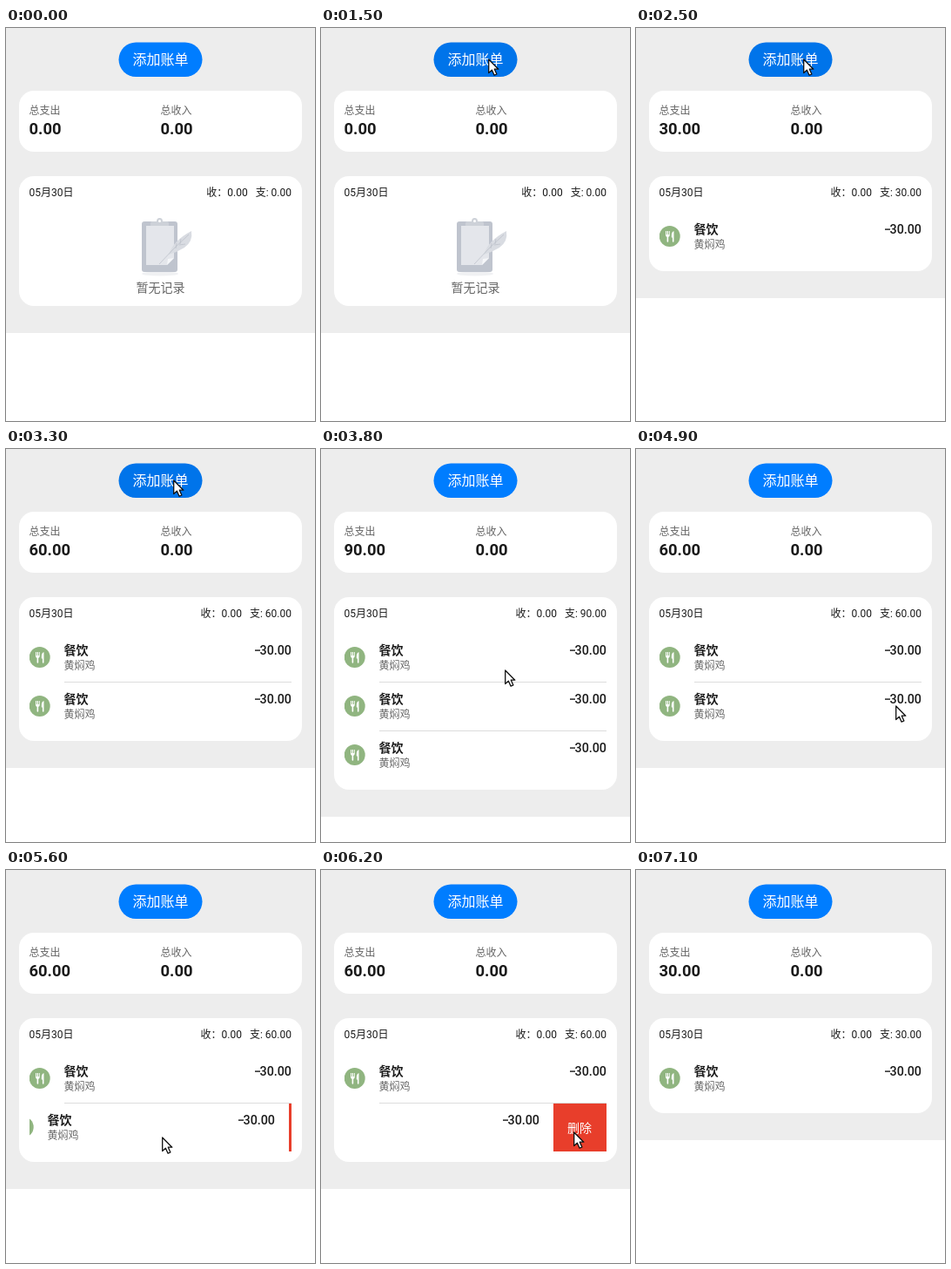
Recreate the animation shown at these times as an HTML page. Size 355x451 px, loop 7.6 s.

```html
<!DOCTYPE html>
<html lang="zh-CN">
<head>
<meta charset="utf-8">
<style>
  html, body { margin: 0; width: 100%; height: 100%; overflow: hidden; background: #fff; }
  svg { display: block; width: 355px; height: 451px; }
  text { font: 12px Roboto, "Noto Sans CJK SC", "Noto Sans CJK", sans-serif; fill: #1a1a1a; white-space: pre; }
  .muted { fill: #666; }
  .sum { font-size: 18.4px; font-weight: 700; }
  .name { font-size: 14px; font-weight: 600; }
  .cost { font-size: 14.3px; font-weight: 500; }
  .mid { text-anchor: middle; }
  .end { text-anchor: end; }
</style>
</head>
<body>
<svg viewBox="0 0 355 451">
  <defs>
    <clipPath id="list"><rect x="27" y="211" width="301" height="168"/></clipPath>
    <g id="row">
      <circle cx="38.7" cy="28" r="12" fill="#90b580"/>
      <path fill="#fff" d="M34 22v4.5q0 2 1.6 2.4V34q0 .8.8.8t.8-.8v-5.1q1.6-.4 1.6-2.4V22h-.9v4h-.9v-4h-1.2v4h-.9v-4zM43.500 22q-2.700 1-2.700 5v2.500h1.100V34q0 .8.8.8t.8-.8z"/>
      <text class="name" x="66.5" y="25">餐饮</text>
      <text class="muted" x="66.5" y="41.5">黄焖鸡</text>
      <text class="cost end" x="328" y="25">30.00</text>
      <rect x="286" y="19.400" width="6" height="1.400" fill="#1a1a1a"/>
    </g>
  </defs>

  <rect id="page" width="355" fill="#ededed"/>
  <rect id="button" x="129.5" y="16.5" width="96" height="39.500" rx="19.750"/>
  <text class="mid" x="177.5" y="42" style="font-size:16px;font-weight:500;fill:#fff">添加账单</text>

  <rect x="15" y="72" width="325" height="70" rx="17" fill="#fff"/>
  <text class="muted" x="26.5" y="98.5">总支出</text>
  <text class="muted" x="177.5" y="98.5">总收入</text>
  <text id="spent" class="sum" x="26.5" y="122"></text>
  <text class="sum" x="177.5" y="122">0.00</text>

  <rect id="card" x="15" y="170" width="325" rx="17" fill="#fff"/>
  <text x="26.5" y="192.5">05月30日</text>
  <text class="end" x="328" y="192.5">收：0.00<tspan id="day" dx="9"></tspan></text>

  <g id="empty">
    <ellipse cx="177" cy="282" rx="21" ry="2.5" fill="#f0f1f3"/>
    <rect x="156" y="222" width="41" height="58" rx="3" fill="#bfc4ce"/>
    <path d="M161 227h32v37l-8 8h-24z" fill="#e4e6eb"/>
    <path d="M193 264l-8 8 1-7z" fill="#f6f7f9"/>
    <path d="M166 227v-3q0-2 2-2h5q0-4 3.5-4t3.5 4h5q2 0 2 2v3z" fill="#cdd1d8"/>
    <circle cx="176.5" cy="221.5" r="1.5" fill="#fff"/>
    <path d="M187 260q5-16 26-27q2 12-8 19q-8 5-18 8z" fill="#d9dce2"/>
    <path d="M176 271q16-18 34-34M195 253l1-6M200 248l1-6M199 249l7-1" fill="none" stroke="#b9bec8" stroke-width=".7"/>
    <text class="muted mid" x="177.5" y="303" style="font-size:14px">暂无记录</text>
  </g>

  <g id="rows" clip-path="url(#list)"></g>

  <path id="cursor" d="M.7 1v15.5l3.7-3.3 2.7 6 2.8-1.2-2.600-5.800h4.500z"
        fill="#fff" stroke="#111" stroke-width="1.3" stroke-linejoin="round"/>
</svg>

<script>
const LOOP = 7600, STEP = 100;
const ROW = 56, PRESS = 300, DRAG = 300, PULL = 90, OPEN = 76;
const $ = id => document.getElementById(id);

const adds = [1700, 2700, 3600];
const swipes = [{ start: 4000, removed: 4900 }, { start: 5500, removed: 6800 }];
const enter = { at: 400, x: 322, y: 258 }, leave = 7100;

// Pointer trips: start time, duration, destination
const trips = [
  [400, 700, 192, 35],
  [3500, 500, 215, 295],
  [4000, DRAG, 215 - PULL, 295],
  [4300, 100, 285, 295],
  [4400, 200, 298, 294],
  [5100, 100, 308, 304],
  [5300, 200, 198, 306],
  [5500, DRAG, 198 - PULL, 306],
  [5800, 300, 290, 300],
  [6800, 300, 305, 400]
];

const clamp = p => Math.min(1, Math.max(0, p));
const easeOut = p => 1 - (1 - p) ** 2;
const easeIn = p => p ** 1.4;

// Pull past the open width, rest briefly, then settle back
function swipeShift(t) {
  const swipe = swipes.find(s => t >= s.start && t < s.removed);
  if (!swipe) return 0;
  const age = t - swipe.start;
  return age <= DRAG
    ? PULL * easeIn(age / DRAG)
    : PULL - (PULL - OPEN) * easeOut(clamp((age - DRAG - 100) / 400));
}

function pointerAt(t) {
  let { x, y } = enter;
  for (const [start, span, toX, toY] of trips) {
    const dragging = swipes.some(s => s.start === start);
    const p = (dragging ? easeIn : easeOut)(clamp((t - start) / span));
    x += (toX - x) * p;
    y += (toY - y) * p;
  }
  return [Math.round(x), Math.round(y)];
}

const rows = adds.map((_, i) => {
  $('rows').insertAdjacentHTML('beforeend', `<g transform="translate(0 ${211 + ROW * i})">
    ${i ? '<path d="M67 .5H328" stroke="#dcdcdc"/>' : ''}
    <g><use href="#row"/><rect x="344" y="1" width="301" height="${ROW - 1}" fill="#e83e2b"/>
    <text x="360" y="33.5" style="font-size:14px;fill:#fff">删除</text></g></g>`);
  const el = $('rows').lastElementChild;
  return { el, body: el.lastElementChild };
});

function draw(t) {
  const count = adds.filter(a => t >= a).length - swipes.filter(s => t >= s.removed).length;
  const pressed = adds.some(a => t >= a - PRESS && t < a);
  const total = (30 * count).toFixed(2);
  const bottom = count ? 223 + ROW * count : 319;

  $('page').setAttribute('height', bottom + 31);
  $('card').setAttribute('height', bottom - 170);
  $('button').setAttribute('fill', pressed ? '#0074ea' : '#007dff');
  $('spent').textContent = total;
  $('day').textContent = '支: ' + total;
  $('empty').style.display = count ? 'none' : '';
  rows.forEach((r, i) => r.el.style.display = i < count ? '' : 'none');
  rows[1].body.setAttribute('transform', `translate(${-Math.round(swipeShift(t))} 0)`);

  $('cursor').style.display = t >= enter.at && t < leave ? '' : 'none';
  $('cursor').setAttribute('transform', `translate(${pointerAt(t)})`);
}

const start = performance.now();
function tick() {
  const t = (performance.now() - start) % LOOP;
  draw(Math.floor(t / STEP) * STEP);
  requestAnimationFrame(tick);
}
tick();
</script>
</body>
</html>
```
